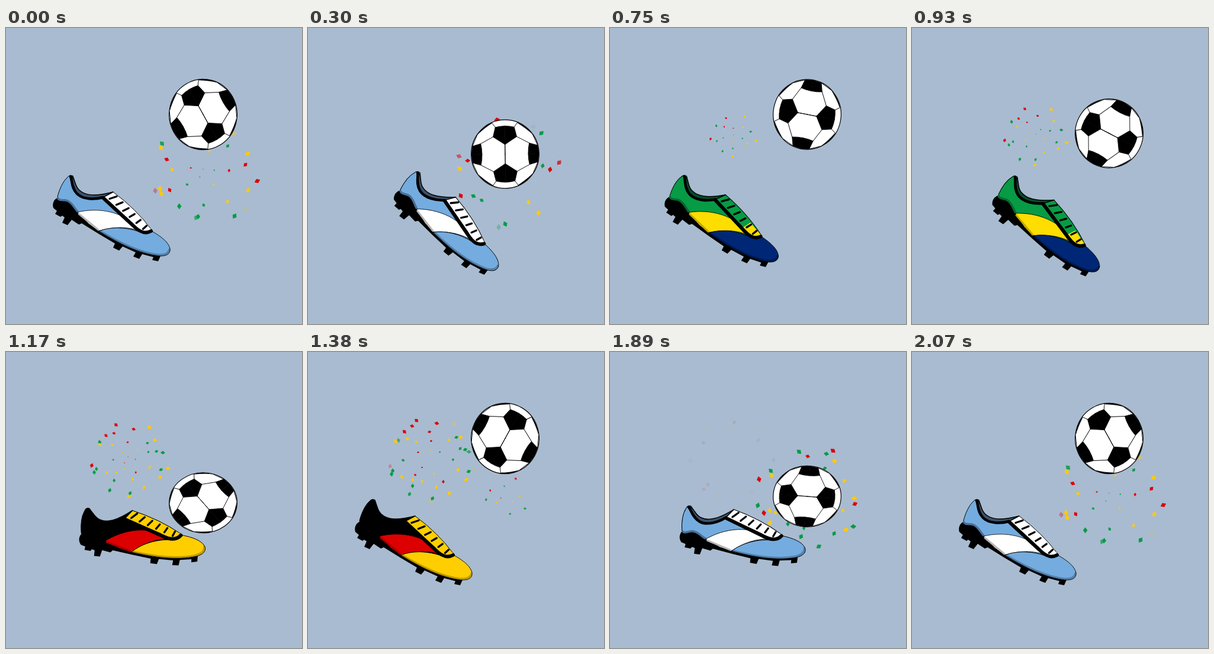
These frames come from a looping animation (500 px wide and 500 px high, 2100 ms). An HTML page with a canvas:

```html
<!DOCTYPE html>
<html>
<head>
<meta charset="utf-8">
<style>
html, body { margin: 0; height: 100%; overflow: hidden; background: #a9bbd0; }
canvas { display: block; width: 100vw; height: 100vh; }
</style>
</head>
<body>
<canvas id="stage" width="500" height="500"></canvas>
<script>
const ctx = document.getElementById('stage').getContext('2d');
const STEP = 30, LOOP = 2100, KICK = 690, CYCLE = 3 * KICK, HIT = 435;
const BLACK = '#000';

// One kick: phase, ball height and stretch, shoe place and tilt.
const KEYS = [
  { at: 0, ball: 146, stretch: 1.04, x: 177, y: 356.5, tilt: 0 },
  { at: 120, ball: 146, stretch: 1.02, x: 200, y: 364, tilt: 7 },
  { at: 240, ball: 178, stretch: 1.015, x: 221.5, y: 368, tilt: 10.5 },
  { at: 300, ball: 213, stretch: 1.01, x: 228, y: 362.5, tilt: 12.8 },
  { at: HIT, ball: 262, stretch: 0.88, x: 240, y: 346, tilt: -20 },
  { at: 570, ball: 217.5, stretch: 0.93, x: 212.5, y: 342.5, tilt: -12.3 }
];

const KITS = [
  { heel: '#74acdf', trim: '#4b7199', stripe: '#fff', fold: '#b5b5b5', toe: '#74acdf', edge: '#5580aa', lace: '#fff', tip: '#fff', inner: '#3b5269' },
  { heel: '#079b45', trim: '#056b30', stripe: '#fedd00', fold: '#c2a800', toe: '#002776', edge: '#001a50', lace: '#079b45', tip: '#fedd00', inner: '#064c28' },
  { heel: BLACK, trim: BLACK, stripe: '#dd0000', fold: '#a80000', toe: '#ffce00', edge: '#c29c00', lace: '#ffce00', tip: '#ffce00', inner: BLACK }
];

const INKS = ['#dd0008', '#079b45', '#fcc90a'];
const PIECES = 42, EMIT = 850, GOLDEN = Math.PI * (3 - Math.sqrt(5));
const BURSTS = [
  { x: 206, y: 181, start: 450, reach: 90, ease: 478, life: 950, size: 4.2, seed: 1 },
  { x: 335, y: 243, start: 1230, reach: 112, ease: 345, life: 760, size: 5.2, seed: 60 }
];

const random = n => {
  const v = Math.sin(n * 127.1) * 43758.5453;
  return v - Math.floor(v);
};

// Smooth cyclic interpolation that never overshoots its keys.
function pose(name, phase) {
  const n = KEYS.length;
  const key = i => KEYS[(i + n) % n];
  const time = i => key(i).at + Math.floor(i / n) * KICK;
  const rate = i => (key(i + 1)[name] - key(i)[name]) / (time(i + 1) - time(i));
  const slope = i => {
    const a = rate(i - 1), b = rate(i);
    return a * b > 0 ? 2 * a * b / (a + b) : 0;
  };
  let i = n - 1;
  while (KEYS[i].at > phase) i--;
  const span = time(i + 1) - time(i), u = (phase - time(i)) / span;
  return key(i)[name] + rate(i) * span * u * u * (3 - 2 * u)
    + span * u * (1 - u) * (slope(i) * (1 - u) - slope(i + 1) * u);
}

function fill(d, color, line = 0) {
  ctx.fillStyle = color;
  ctx.fill(new Path2D(d));
  if (line) stroke(d, BLACK, line);
}

function stroke(d, color, width) {
  ctx.strokeStyle = color;
  ctx.lineWidth = width;
  ctx.stroke(new Path2D(d));
}

// Pieces leave the centre one after another, slow down and fade.
function drawBurst(b, t) {
  const fade = (end, span) => Math.max(0, Math.min(1, (end - t) / span));
  for (let i = 0; i < PIECES; i++) {
    const born = b.start + EMIT * (i / PIECES) ** 1.3;
    if (t <= born) continue;
    const grow = 1 - Math.exp((born - t) / b.ease);
    const angle = i * GOLDEN + random(i + b.seed) * 0.7;
    const dist = b.reach * grow * (0.8 + 0.2 * random(i + b.seed + 200));
    const size = Math.min(b.size, 0.6 + b.size * grow * 1.1);
    ctx.save();
    ctx.globalAlpha = fade(born + b.life, 100) * fade(b.start + 1450, 100);
    ctx.translate(b.x + dist * Math.cos(angle), b.y + dist * Math.sin(angle));
    ctx.rotate(i * 1.9);
    fill(`M${-size} 0L0 ${-size * 0.75} ${size} 0 0 ${size * 0.75}Z`, INKS[Math.floor(3 * random(i + b.seed + 400))]);
    ctx.restore();
  }
}

function drawShoe(kit, x, y, tilt) {
  ctx.save();
  ctx.translate(x, y);
  ctx.rotate(tilt * Math.PI / 180);
  ctx.translate(-177, -356.5);
  // sole and studs
  fill('M88 286C80 290 78 297 80 304L86 309 83 314 92 319 95 317 99 320 95 329 104 333 111 324 123 332 128 330 157 348 184 364 181 371 191 376 197 369 219 379 215 386 225 390 230 382 249 387 247 392 257 394 261 385 240 375 150 330 120 306 100 288Z', BLACK);
  // heel
  fill('M113 250Q108 247 104 252C96 259 90 273 87 285 88 292 98 289 104 291 113 295 116 306 122 311L200 340 232 344 164 286C148 291 128 287 119 276 114 268 117 256 113 250Z', kit.heel, 1);
  stroke('M88 288C91 293 98 289 104 292 113 296 115 304 121 310', kit.trim, 3.5);
  // side stripe
  fill('M121 311C155 303 200 308 229 344 205 334 178 336 157 343L140 331Z', kit.stripe, 0.8);
  stroke('M123 314L156 341', kit.fold, 3);
  // toe
  const toe = 'M157 343C178 335 205 336 230 346L246 343C262 352 275 362 277 373 278 381 272 386 258 385 225 381 190 364 157 343Z';
  fill(toe, kit.toe);
  stroke('M159 343C190 362 225 379 256 383 269 384 275 380 276 374', kit.edge, 3.5);
  stroke(toe, BLACK, 0.9);
  // lacing
  fill('M163 284L181 277Q220 306 246 341C243 347 236 348 229 343Z', kit.lace, 1);
  fill('M226 321L245 340C243 347 236 348 229 343L214 330Z', kit.tip);
  stroke('M161 284L215 334C227 346 236 348 245 343', BLACK, 6);
  for (let i = 0; i < 6; i++) {
    stroke(`M${175 + 11.3 * i} ${288.5 + 10.2 * i}l${12 - 1.2 * i} ${-4 - 0.3 * i}`, BLACK, 3.3);
  }
  // collar
  fill('M110 250C118 254 115 267 124 274 134 283 150 285 181 277L164 286C146 291 124 288 117 276 111 266 112 255 110 250Z', kit.inner, 1.5);
  stroke('M109 251C112 256 110 270 120 280 130 290 150 290 164 286', BLACK, 4.5);
  ctx.restore();
}

// The seams repeat in the four quarters of the ball.
function drawBall(y, stretch, angle) {
  const rim = 'M57.3 0A57.3 57.3 0 1 1 -57.3 0A57.3 57.3 0 1 1 57.3 0Z';
  ctx.save();
  ctx.translate(333, y);
  ctx.scale(1, stretch);
  ctx.rotate(angle * Math.PI / 180);
  fill(rim, '#fff');
  for (const sx of [1, -1]) {
    for (const sy of [1, -1]) {
      ctx.save();
      ctx.scale(sx, sy);
      fill('M0 -16L20 -29 16 -45Q8 -47 0 -47Z', BLACK, 0.8);
      fill('M39 0Q39 -10 41 -18L55 -14 57 0Z', BLACK, 0.8);
      fill('M21 -52Q36 -43 47 -32A57 57 0 0 0 21 -53Z', BLACK);
      stroke('M0 -16V0M20 -29L41 -18M16 -45L21 -52M47 -32L55 -14', BLACK, 0.9);
      ctx.restore();
    }
  }
  stroke(rim, BLACK, 1.2);
  ctx.restore();
}

function draw(now) {
  const t = Math.floor(now % LOOP / STEP) * STEP % CYCLE;
  const sinceHit = t + KICK - HIT, kicks = Math.floor(sinceHit / KICK);
  const spin = 1 - (1 - sinceHit % KICK / KICK) ** 3;
  const at = name => pose(name, t % KICK);
  ctx.lineCap = ctx.lineJoin = 'round';
  ctx.fillStyle = '#a9bbd0';
  ctx.fillRect(0, 0, 500, 500);
  for (const b of BURSTS) {
    drawBurst(b, t);
    drawBurst(b, t + CYCLE);
  }
  drawShoe(KITS[kicks % 3], at('x'), at('y'), at('tilt'));
  drawBall(at('ball'), at('stretch'), 120 * (kicks + spin - 1));
  requestAnimationFrame(() => draw(performance.now() - origin));
}

const origin = performance.now();
draw(0);
</script>
</body>
</html>
```
